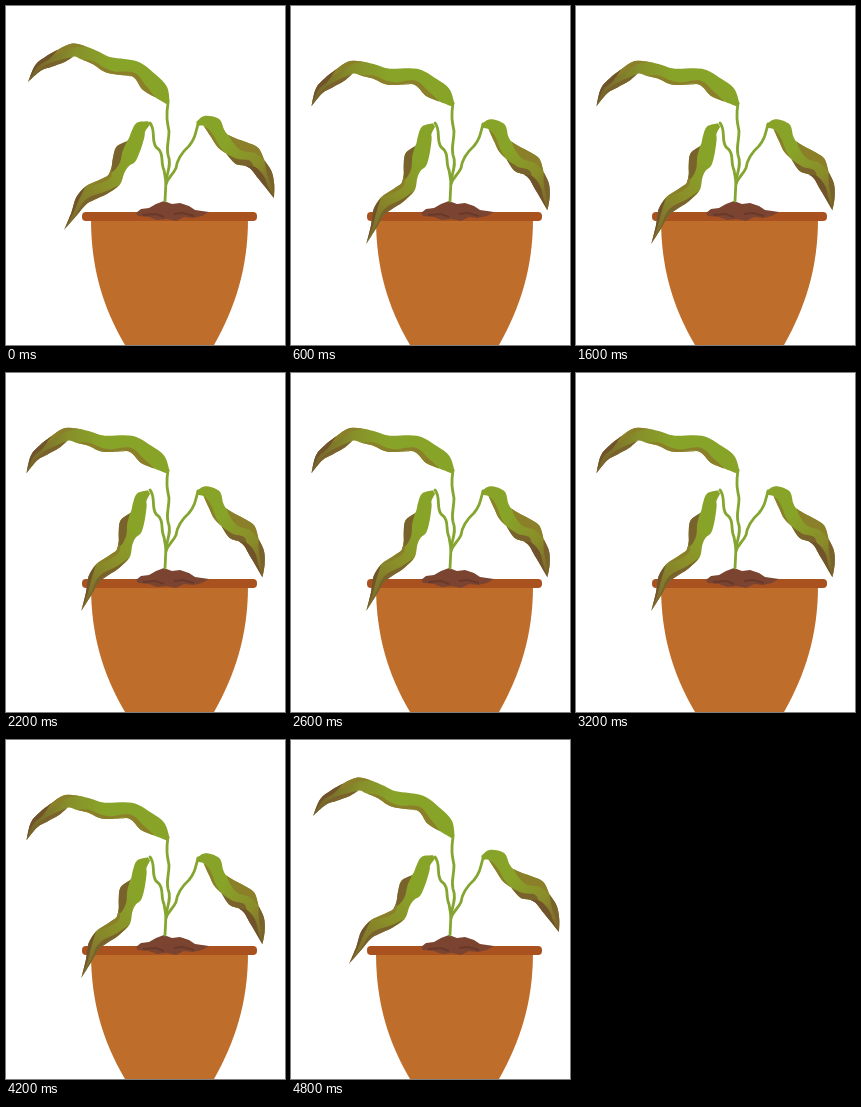
Animation of 279 by 339 pixels, one loop 5010 ms. Source, as an HTML page:

```html
<!DOCTYPE html>
<html lang="en">
<head>
<meta charset="utf-8">
<title>Wilting plant</title>
<style>
  html, body { margin: 0; width: 100%; height: 100%; overflow: hidden; background: #fff; }
  svg { display: block; width: 100vw; height: 100vh; }
</style>
</head>
<body>
<svg viewBox="0 0 279 339">
  <defs>
    <linearGradient id="top" x1="1" y1=".6" x2="0" y2=".5">
      <stop offset=".45" stop-color="#88a428"/><stop offset=".7" stop-color="#87902a"/><stop offset="1" stop-color="#75602b"/>
    </linearGradient>
    <linearGradient id="left" x1="1" y1="0" x2=".1" y2="1">
      <stop offset=".3" stop-color="#88a428"/><stop offset=".6" stop-color="#8b9029"/><stop offset="1" stop-color="#7c692c"/>
    </linearGradient>
    <linearGradient id="right" x1="0" y1="0" x2="1" y2="1">
      <stop offset=".35" stop-color="#88a428"/><stop offset=".7" stop-color="#8a8b29"/><stop offset="1" stop-color="#785f2a"/>
    </linearGradient>
  </defs>
  <path fill="#bf6d2a" d="M85 213H242C242 262 229 302 208 339H119C97 302 85 262 85 213Z"/>
  <rect x="76" y="206" width="175" height="9" rx="4" fill="#a9521f"/>
  <path fill="#7a4430" d="M130 207L135 203L143 202L150 198L158 195L166 198L174 197L183 200L189 204L203 206L196 210L187 212L178 211L170 215L161 213L151 214L143 211L132 210Z"/>
  <path fill="none" stroke="#68382b" stroke-width="2" d="M137 209L150 208L158 211M168 208L177 207L188 210"/>
  <g fill="none" stroke="#84a52f" stroke-width="2.800" stroke-linecap="round">
    <path d="M162 97C160 110 161 115 163 125C163 136 160 140 162 149C166 158 161 167 160 175L159 195"/>
    <path d="M144 117C150 124 145 134 150 141C159 147 154 156 158 164L160 176"/>
    <path d="M192 118C189 130 188 134 183 140C174 148 171 155 170 162C167 169 162 171 160 178"/>
  </g>
  <g id="leaves"></g>
</svg>
<script>
// spine: key points [x, y, half width] from base to tip; turn: degrees of droop per pose.
// patches: [first key, last key, side, depth, colour], where sides run from -1 to 1.
const OLIVE = "#8b7f2a", BROWN = "#79622b", DARK = "#70532a";
const leaves = [
  {
    name: "top", turn: -9,
    spine: [[162, 97, 2], [155, 86, 8], [143, 76, 10], [129, 63, 8], [103, 59, 8], [90, 52, 7],
            [78, 47, 7], [67, 44, 6.5], [55, 50, 7], [43, 55.5, 6], [32, 62, 4], [22, 76, 0]],
    patches: [[1, 4, -1, -.4, OLIVE], [3, 6, -1, -.5, OLIVE], [6, 9, 1, .3, OLIVE],
              [7, 11, -1, -.3, BROWN], [8, 11, 1, .2, DARK]]
  },
  {
    name: "left", turn: -8.8,
    spine: [[143, 117, 2], [135, 121, 6], [132, 128, 7], [128, 139, 8], [120, 148, 12], [115, 156, 9], [112, 164, 7],
            [108, 174, 7.5], [97, 181, 8], [84, 187, 8], [75, 195, 6], [68, 208, 3], [58, 224, 0]],
    patches: [[3, 7, 1, .1, BROWN], [6, 9, 1, .5, OLIVE], [7, 12, -1, -.4, BROWN], [9, 12, 1, .3, DARK]]
  },
  {
    name: "right", turn: 8.3,
    spine: [[191, 118, 2], [198, 115, 5], [207, 119, 8.5], [212, 128, 7.5], [217, 135, 8], [225, 140, 9],
            [235, 147, 12], [246, 151, 11], [252, 159, 8], [259, 169, 7.5], [264, 180, 4.5], [268, 192, 0]],
    patches: [[1, 5, 1, .6, OLIVE], [4, 8, -1, -.2, OLIVE], [5, 9, 1, .4, BROWN],
              [8, 11, -1, -.2, BROWN], [7, 11, 1, .2, DARK]]
  }
];
const STEP = 200, LOOP = 5010, POSES = [0, 1, 1.45, 1, 0];
const group = document.getElementById("leaves");

function add(parent, tag, attrs) {
  const node = document.createElementNS("http://www.w3.org/2000/svg", tag);
  for (const key in attrs) node.setAttribute(key, attrs[key]);
  return parent.appendChild(node);
}

// Point beside spine key i; side 0 is the midrib, -1 and 1 are the edges.
function beside(spine, i, side) {
  const [x, y, w] = spine[i];
  const a = spine[Math.max(i - 1, 0)], b = spine[Math.min(i + 1, spine.length - 1)];
  const dx = b[0] - a[0], dy = b[1] - a[1], d = side * w / Math.hypot(dx, dy);
  return [x - dy * d, y + dx * d];
}

// Smooth curve through points, as path commands after the first point.
function curve(pts) {
  return pts.slice(1).map((q, i) => {
    const p = pts[i], before = pts[i - 1] || p, after = pts[i + 2] || q;
    return "C" + [p[0] + (q[0] - before[0]) / 6, p[1] + (q[1] - before[1]) / 6,
                  q[0] - (after[0] - p[0]) / 6, q[1] - (after[1] - p[1]) / 6, ...q];
  }).join("");
}

// Band along the leaf: straight along one side, bulging to the other.
function band(spine, from, to, side, bulge) {
  const there = [], back = [];
  for (let i = from; i <= to; i++) {
    there.push(beside(spine, i, side));
    back.unshift(beside(spine, i, bulge((i - from) / (to - from))));
  }
  return `M${there[0]}${curve(there)}L${back[0]}${curve(back)}Z`;
}

for (const leaf of leaves) {
  const { name, spine, patches } = leaf, last = spine.length - 1;
  leaf.node = add(group, "g");
  add(leaf.node, "path", { fill: `url(#${name})`, d: band(spine, 0, last, 1, () => -1) });
  for (const [from, to, side, depth, fill] of patches) {
    const bulge = t => side + (depth - side) * Math.sin(Math.PI * t);
    add(leaf.node, "path", { fill, d: band(spine, from, to, side, bulge) });
  }
}

function draw(k) {
  for (const { node, turn, spine: [[x, y]] } of leaves) {
    node.setAttribute("transform", `translate(0 ${2 * k}) rotate(${turn * k} ${x} ${y})`);
  }
}

function tick() {
  const step = Math.min(24, Math.floor(performance.now() % LOOP / STEP));
  draw(POSES[step % 5]);
  requestAnimationFrame(tick);
}
tick();
</script>
</body>
</html>
```
